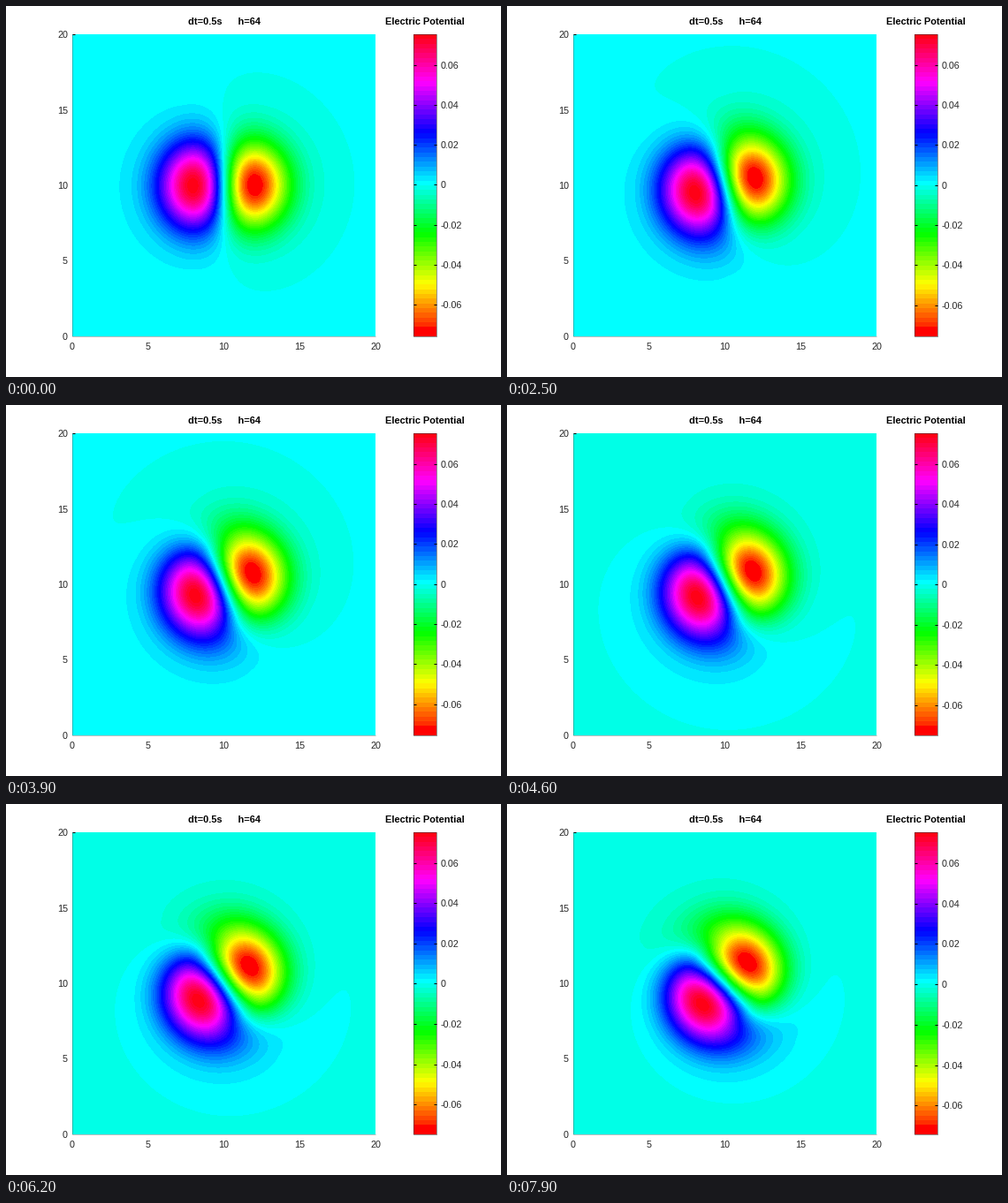
Write a matplotlib script that moves like this. It is 560 px wide and 420 px high and loops after 8 s.

```python
import colorsys

import matplotlib.pyplot as plt
import numpy as np
from matplotlib.animation import FuncAnimation
from matplotlib.colors import ListedColormap

plt.rcParams["font.family"] = "Liberation Sans"

W, H, DPI = 560, 420, 100
FRAMES, STEP = 80, 100
LEFT, RIGHT, TOP, BOTTOM = 75, 418, 32, 374
BAR_L, BAR_R = 461, 487
LEVELS = 64
SIGMA = 2.04
INK = "#262626"

hues = np.arange(LEVELS) / LEVELS
hues[1] = 0
cmap = ListedColormap([colorsys.hsv_to_rgb(h, 1, 1) for h in hues])

# Polar grid around the middle of the 20 x 20 domain
nx, ny = RIGHT - LEFT, BOTTOM - TOP
gx = (np.arange(nx) + 0.5) / nx * 20 - 10
gy = 10 - (np.arange(ny) + 0.5) / ny * 20
X, Y = np.meshgrid(gx, gy)
R, THETA = np.hypot(X, Y), np.arctan2(Y, X)
TAIL = R - 0.3 * np.maximum(R - 6, 0)
ENVELOPE = TAIL / SIGMA * np.exp(0.5 - (TAIL / SIGMA) ** 2 / 2)
SHEAR = np.maximum(R - 2.5, 0) ** 1.6


def limits(t):
    """Lower and upper colour limit at time t (seconds)."""
    mid = np.interp(t, [0, 1.4, 2.5, 3.9, 4.3, 4.4, 5.4, 6.9, 7.9],
                    [-3, -4.5, -1.2, -1, -0.7, 0.7, 1, 3, 5]) * 1e-4
    half = np.interp(t, [0, 3.9, 5.4, 7.9], [0.0756, 0.0754, 0.0750, 0.0748])
    return mid - half, mid + half


def potential(t):
    """Turning dipole whose far field is wound ahead of the core."""
    lo, hi = limits(t)
    twist = np.minimum((0.35 + 0.7 * t) * SHEAR, 110)
    turn = np.radians(0.5 + 5.45 * t + twist)
    wave = -ENVELOPE * np.cos(THETA - turn)
    return np.where(wave > 0, hi, -lo) * wave


fig = plt.figure(figsize=(W / DPI, H / DPI), dpi=DPI, facecolor="white")
ax = fig.add_axes([0, 0, 1, 1])
ax.set_axis_off()


def label(x, y, s, size=10.7, **kw):
    kw.setdefault("color", INK)
    return ax.text(x, y, s, fontsize=size * 72 / DPI, va="baseline", **kw)


def line(xs, ys, **kw):
    style = dict(color="black", lw=0.72, solid_capstyle="butt") | kw
    return ax.plot(xs, ys, **style)[0]


def tick(x0, x1, y):
    return line([x0, x1], [y, y])


field = ax.imshow(potential(0), cmap=cmap, interpolation="nearest",
                  extent=(LEFT, RIGHT, BOTTOM, TOP))
ax.imshow(np.arange(LEVELS)[::-1, None], cmap=cmap, interpolation="nearest",
          extent=(BAR_L, BAR_R, BOTTOM, TOP))
ax.set_xlim(0, W)
ax.set_ylim(H, 0)
ax.set_aspect("auto")

line([LEFT, LEFT, RIGHT], [TOP, BOTTOM, BOTTOM], color=INK, alpha=0.3)
line([BAR_L, BAR_R, BAR_R, BAR_L, BAR_L], [TOP, TOP, BOTTOM, BOTTOM, TOP],
     color=INK, alpha=0.5)

for v in range(0, 21, 5):
    label(LEFT + v / 20 * nx, 389, str(v), ha="center")
    label(70, round(BOTTOM - v / 20 * ny) + 4, str(v), ha="right")
tick(LEFT, LEFT + 3, TOP - 0.5)

bold = dict(size=11, weight="bold", ha="center", color="black")
label(246.5, 21, "dt=0.5s      h=64", **bold)
label(473.5, 21, "Electric Potential", **bold)

marks = []
for k in range(-3, 4):
    v = k * 0.02
    marks.append((v, label(492, 0, f"{v:.2f}" if k else "0"),
                  tick(BAR_L, BAR_L + 3, 0), tick(BAR_R - 3, BAR_R, 0)))


def update(i):
    t = i * STEP / 1000
    lo, hi = limits(t)
    field.set_data(potential(t))
    field.set_clim(lo, hi)
    for v, text, *ticks in marks:
        y = TOP + (hi - v) / (hi - lo) * ny
        text.set_y(round(y) + 4)
        for mark in ticks:
            mark.set_ydata([y, y])
    return [field]


anim = FuncAnimation(fig, update, frames=FRAMES, interval=STEP,
                     repeat=True, repeat_delay=0, blit=False)
plt.show()
```
